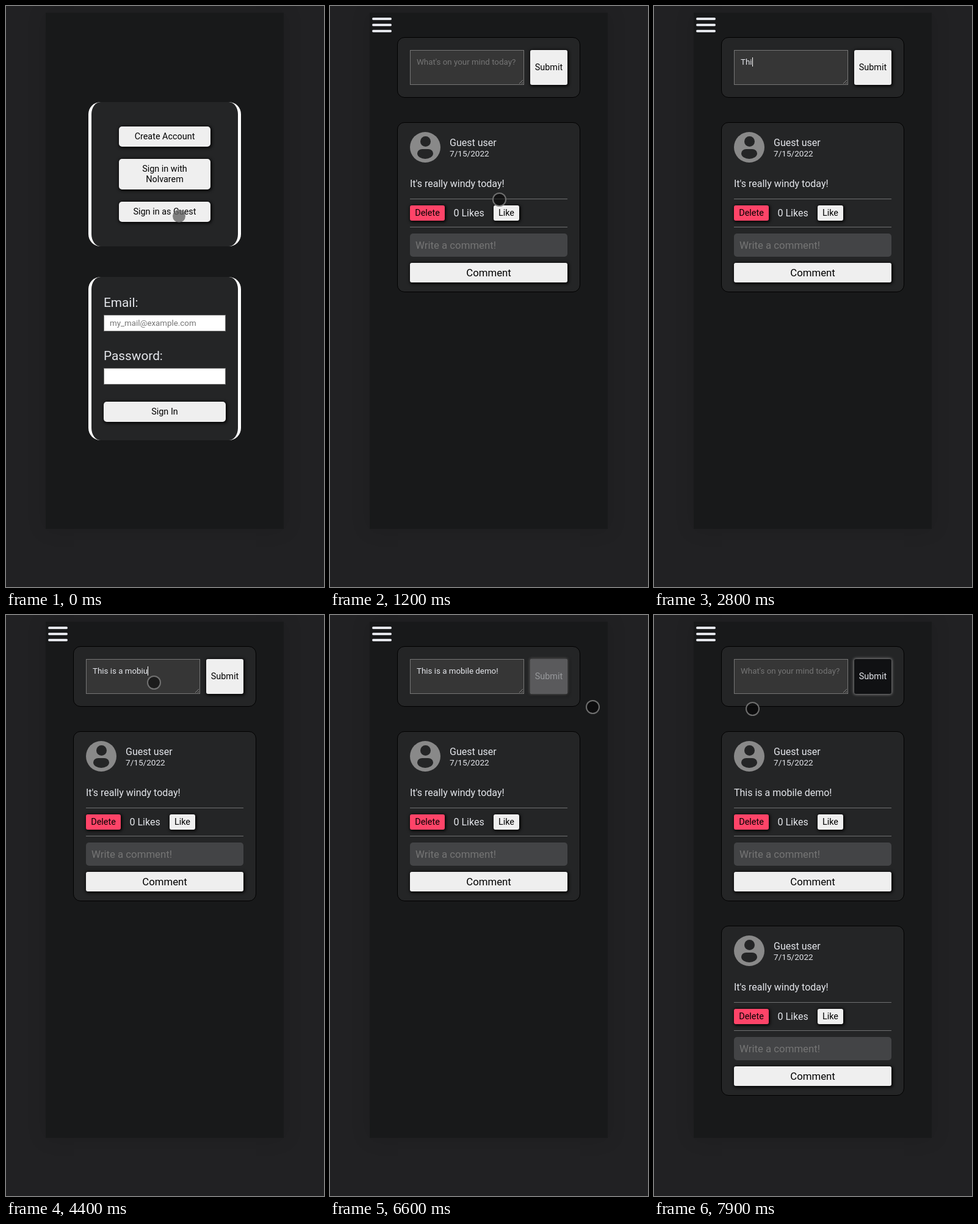
These frames come from a looping animation (521x950 px, 8000 ms). An HTML page:

```html
<!DOCTYPE html>
<html lang="en">
<head>
<meta charset="utf-8">
<title>Mobile demo</title>
<style>
  html, body { margin: 0; width: 100%; height: 100%; overflow: hidden; background: #212123; }
  body { position: relative; font: 16px Roboto, sans-serif; color: #e4e6eb; }
  div { position: absolute; box-sizing: border-box; white-space: pre; }
  .phone { background: #18191a; box-shadow: 0 0 30px rgba(0, 0, 0, .13); }
  .panel { background: #242526; border: solid #fff; border-width: 0 5px; border-radius: 20px; }
  .card { background: #242526; border: 1px solid #000; border-radius: 12px; }
  .btn { background: #efefef; color: #000; border-radius: 5px; text-align: center;
         font-size: 14.4px; box-shadow: 1px 1px 5px 1px #000; }
  .small { border-radius: 3px; }
  .red { background: #ff4468; }
  .big { font-size: 16.8px; }
  .dark { background: #101113; color: #e4e6eb; box-shadow: 0 0 4px 1px #858585; }
  .label { font-size: 20.8px; }
  .input { background: #fff; border: 1px solid #767676; }
  .hint { color: #757575; font-size: 13.333px; }
  .area { background: #363636; border: 1px solid #767676; }
  .typed { font-size: 13.333px; }
  .date { font-size: 13.6px; }
  .rule { background: #6f7071; }
  .field { background: #434446; border-radius: 5px; padding-left: 9px; color: #757575; font-size: 16.8px; }
  .bar { background: #e4e6eb; border-radius: 2px; }
  .avatar { background: #898989; border-radius: 50%; }
  .hole { background: #242526; }
  .caret { display: inline-block; position: relative; width: 0; height: 15px; vertical-align: top; }
  .caret::after { content: ""; position: absolute; left: 0; top: 0; width: 1px; height: 15px; background: #fff; }
  .cursor { border-radius: 50%; }
  .ring { background: rgba(0, 0, 0, .5); border: 2px solid rgba(135, 135, 135, .8); }
  .press { background: rgba(100, 100, 100, .8); border: 1.5px solid transparent; background-clip: padding-box; }
</style>
</head>
<body>
<script>
const box = (parent, cls, x, y, w, h, text = '', line = h) => {
  const el = document.createElement('div');
  el.className = cls;
  el.style.cssText = `left:${x}px;top:${y}px;width:${w}px;height:${h}px;line-height:${line}px`;
  el.textContent = text;
  parent.append(el);
  return el;
};
const layer = () => box(document.body, '', 0, 0, 521, 950);
const show = (el, on) => el.style.display = on ? '' : 'none';

// A button with a dark copy on top that can be faded in.
const fadeButton = (parent, cls, ...rest) => {
  const light = box(parent, cls, ...rest);
  const dark = box(parent, cls + ' dark', ...rest);
  return p => {
    dark.style.opacity = p;
    light.style.opacity = p < 1 ? 1 : 0;
  };
};

box(document.body, 'phone', 65, 11, 390, 844);

// Sign-in screen
const login = layer();
box(login, 'panel', 135, 157, 250, 236);
box(login, 'btn', 185, 197, 150, 33, 'Create Account');
const partner = box(login, 'btn', 185, 250, 150, 50, 'Sign in with\nNolvarem', 17);
partner.style.paddingTop = '8px';
const guest = fadeButton(login, 'btn', 185, 320, 150, 33, 'Sign in as Guest');
box(login, 'panel', 135, 443, 250, 267);
box(login, 'label', 160, 473, 200, 24, 'Email:');
box(login, 'input', 160, 505, 200, 27);
box(login, 'hint', 170, 511, 180, 15, 'my_mail@example.com');
box(login, 'label', 160, 560, 200, 24, 'Password:');
box(login, 'input', 160, 592, 200, 27);
box(login, 'btn', 160, 647, 200, 33, 'Sign In');

// Feed screen
const feed = layer();
for (const y of [19, 29, 39]) box(feed, 'bar', 69, y, 32, 4);
box(feed, 'card', 110, 51, 300, 99);
box(feed, 'area', 131, 72, 187, 57).insertAdjacentHTML('beforeend',
  '<svg width="8" height="8" style="position:absolute;right:0;bottom:0"><path d="M1 7L7 1M5 7L7 5" stroke="#999" stroke-width=".8"/></svg>');
const hint = box(feed, 'hint', 142, 84, 170, 15, "What's on your mind today?");
const typed = box(feed, 'typed', 142, 84, 170, 15);
const typedText = document.createTextNode('');
const caret = document.createElement('span');
caret.className = 'caret';
typed.append(typedText, caret);
const submit = fadeButton(feed, 'btn small', 328, 72, 61, 57, 'Submit');

const post = (y, message) => {
  const el = box(feed, '', 110, y, 300, 278);
  box(el, 'card', 0, 0, 300, 278);
  box(el, 'avatar', 21, 16, 50, 50);
  box(el, 'hole', 38, 23, 17, 17).style.borderRadius = '50%';
  box(el, 'hole', 33, 44, 26, 16).style.borderRadius = '8px 8px 13px 13px / 7px 7px 9px 9px';
  box(el, '', 86, 24, 200, 19, 'Guest user');
  box(el, 'date', 86, 43, 200, 16, '7/15/2022');
  const body = box(el, '', 21, 91, 258, 19, message);
  box(el, 'rule', 21, 125, 258, 1);
  box(el, 'btn small red', 21, 136, 57, 25, 'Delete');
  box(el, '', 92.5, 139, 60, 19, '0 Likes');
  box(el, 'btn small', 158, 136, 42, 25, 'Like');
  box(el, 'rule', 21, 171, 258, 1);
  box(el, 'field', 21, 182, 258, 38, 'Write a comment!');
  box(el, 'btn small big', 21, 230, 258, 32, 'Comment');
  return { el, body };
};
const first = post(190, '');
const second = post(508, "It's really windy today!");

const cursor = box(document.body, 'cursor', 0, 0, 23, 23);

// time, text already there, letters added one per 100 ms
const typing = [
  [0, '', ''], [2600, '', 'This is a'], [3500, 'This is a ', 'm'],
  [3700, 'This is a m', 'ob'], [3900, 'This is a mobi', 'u'], [4100, 'This is a mobiu', 'l'],
  [4400, 'This is a mobiu', ''], [4500, 'This is a mobi', ''], [4600, 'This is a mobi', 'le demo'],
  [5400, 'This is a mobile demo', '!'], [6700, '', '']
];
// time, x, y of the cursor centre
const path = [
  [0, 283.5, 343.5], [1100, 283.5, 343.5], [1500, 259.5, 235.5], [1700, 242.5, 110.5],
  [5700, 242.5, 110.5], [5800, 262, 120], [5900, 310, 126.5], [6000, 361.5, 114.5],
  [6400, 361.5, 114.5], [6600, 430, 150], [6900, 488.5, 225], [7000, 465, 262],
  [7100, 395, 266], [7200, 313.5, 231.5], [7400, 226, 201], [7700, 226, 201],
  [7900, 161.5, 153.5], [8000, 161.5, 153.5]
];
const within = (t, ...spans) => spans.some(([a, b]) => t >= a && t < b);
const ramp = (t, a, b) => Math.min(1, Math.max(0, (t - a) / (b - a)));

function draw(t) {
  show(login, t < 900);
  show(feed, t >= 900);
  guest(ramp(t, 400, 700));
  submit(ramp(t, 6400, 6700));

  const [start, base, added] = typing.findLast(k => k[0] <= t);
  const text = base + added.slice(0, (t - start) / 100 + 1);
  typedText.data = text;
  show(hint, !text);
  show(caret, within(t, [2100, 5900]));

  first.body.textContent = t < 7300 ? "It's really windy today!" : 'This is a mobile demo!';
  show(first.el, t >= 1200);
  show(second.el, t >= 7300);

  const i = path.findLastIndex(p => p[0] <= t);
  const [t0, x0, y0] = path[i], [t1, x1, y1] = path[i + 1];
  const p = ramp(t, t0, t1);
  cursor.style.left = x0 + (x1 - x0) * p - 11.5 + 'px';
  cursor.style.top = y0 + (y1 - y0) * p - 11.5 + 'px';
  cursor.className = 'cursor ' + (within(t, [0, 400], [1800, 1900], [6100, 6400]) ? 'press' : 'ring');
  // the pointer hides while letters are typed
  show(cursor, !within(t, [2600, 4400], [4600, 5400]));
}

const origin = performance.now();
function tick() {
  const t = (performance.now() - origin) % 8000;
  draw(Math.floor(t / 100) * 100);
  requestAnimationFrame(tick);
}
tick();
</script>
</body>
</html>
```
